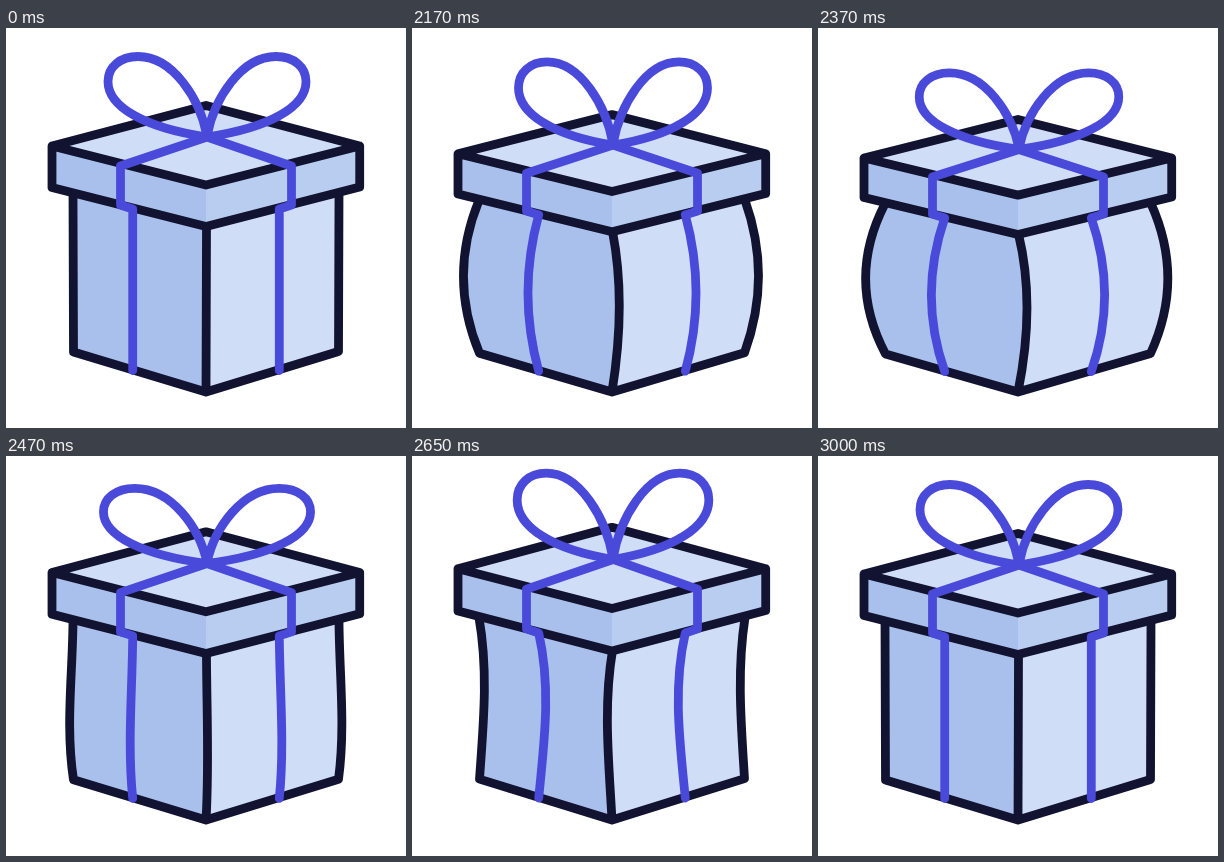
Animation of 400 by 400 pixels, one loop 3020 ms. Source, as an HTML page:

```html
<!DOCTYPE html>
<html lang="en">
<head>
<meta charset="utf-8">
<title>Gift box</title>
<style>
  html, body { margin: 0; width: 100%; height: 100%; overflow: hidden; background: #fff; }
  svg { display: block; width: 100vw; height: 100vh; }
  path { stroke-width: 8.8; stroke-linecap: round; stroke-linejoin: round; }
  .edge { fill: none; stroke: #121331; }
  .ribbon { fill: none; stroke: #4a4ada; }
</style>
</head>
<body>
<svg id="stage" viewBox="0 0 400 400"></svg>
<script>
const LOOP = 3020, START = 2000, END = 3000, FLOOR = 364;
const SHADE = '#a8c0eb', SIDE = '#b9cdf0', LIGHT = '#cfddf6';

const sine = u => (1 - Math.cos(Math.PI * u)) / 2;
const brake = u => 1 - (1 - u) ** 2;
const settle = u => 1 - (1 - u) ** 4;
const swing = u => u < .5 ? 4 * u ** 3 : 1 - 4 * (1 - u) ** 3;

// Eases from a resting value through [time, value, ease] stops and settles back
function travel(t, rest, ...stops) {
  let from = START, value = rest;
  if (t <= from) return rest;
  for (const [to, next, ease] of [...stops, [END, rest, settle]]) {
    if (t < to) return value + (next - value) * ease((t - from) / (to - from));
    from = to;
    value = next;
  }
  return rest;
}

// The box sinks, springs up and settles; its walls and bow follow late
function pose(t) {
  const squash = travel(t, 0, [2320, .058, sine], [2580, -.045, sine]);
  const upper = travel(t, 0, [2320, 27, brake], [2620, -26, swing]);
  const lower = travel(t, 0, [2320, 27, brake], [2620, -11, swing]);
  const bowH = travel(t, 1, [2160, 1.035, sine], [2460, .93, sine], [2580, 1.15, sine]);
  const bowW = 1 - .7 * (bowH - 1) - .001 * upper;
  return { squash, upper, lower, bowH, bowW };
}

// Motion advances in alternating 20 and 30 ms steps
function snap(t) {
  if (t < 2020) return 0;
  const [base, gap] = t < 2550 ? [2020, 30] : [2550, 20];
  const rest = (t - base) % 50;
  return t - rest + (rest >= gap ? gap : 0);
}

const stage = document.getElementById('stage');

function addPath(kind, fill) {
  const p = document.createElementNS('http://www.w3.org/2000/svg', 'path');
  if (kind) p.setAttribute('class', kind);
  if (fill) p.setAttribute('fill', fill);
  stage.append(p);
  return d => p.setAttribute('d', d);
}

const bodyLeft = addPath('', SHADE), bodyRight = addPath('', LIGHT);
const bodyEdge = addPath('edge');
const lidLeft = addPath('', SHADE), lidRight = addPath('', SIDE), lidTop = addPath('', LIGHT);
const lidEdge = addPath('edge');
const ribbon = addPath('ribbon'), bow = addPath('ribbon');

function draw(t) {
  const { squash, upper, lower, bowH, bowW } = pose(snap(t));
  const y = v => v + (FLOOR - v) * squash;
  const pt = (x, v) => `${x.toFixed(2)} ${y(v).toFixed(2)}`;
  const line = (...pts) => pts.map(p => pt(...p)).join(' L');
  // Continues from (x0, y0) to (x1, y1), bowed sideways by a, then b
  const bend = (x0, y0, x1, y1, a, b) => ' C' + [
    pt(x0 + (x1 - x0) / 3 + a, y0 + (y1 - y0) / 3),
    pt(x1 - (x1 - x0) / 3 + b, y1 - (y1 - y0) / 3),
    pt(x1, y1)].join(' ');

  // Outer walls give less inwards than outwards
  const wall = v => v < 0 ? v / 2 : v;
  const a = wall(upper), b = wall(lower);
  const left = 'M' + pt(67, 166) + bend(67, 166, 67.5, 324, -a, -b);
  const right = 'M' + pt(333, 166) + bend(333, 166, 332.5, 323.5, a * .87, b * .87);
  const front = 'M' + pt(200.5, 198) + bend(200.5, 198, 200, 364, upper / 2, lower / 2.5);
  const frontUp = ' L' + pt(200, 364) + bend(200, 364, 200.5, 198, lower / 2.5, upper / 2) + ' Z';
  bodyLeft(left + frontUp);
  bodyRight(right + frontUp);
  bodyEdge(left + ' L' + line([200, 364], [332.5, 323.5]) + right + front);

  const W = [46, 118], N = [200, 77.5], E = [353.7, 118], S = [200, 157];
  const lowW = [46, 159.5], lowS = [200, 198.5], lowE = [353.7, 159];
  lidLeft('M' + line(W, S, lowS, lowW) + ' Z');
  lidRight('M' + line(E, S, lowS, lowE) + ' Z');
  lidTop('M' + line(W, N, E, S) + ' Z');
  lidEdge('M' + line(W, N, E, S) + ' Z M' + line(W, lowW, lowS, lowE, E));

  const strap = dir => {
    const over = 200 + dir * 85.5, down = 200 + dir * 73.3;
    return 'M' + line([201, 109], [over, 138], [over, 177], [down, 181])
      + bend(down, 181, down, 342.5, dir * upper * .68, dir * lower * .68);
  };
  ribbon(strap(-1) + strap(1));

  const loop = dir => {
    const p = (dx, dy) => `${(201 + dir * dx * bowW).toFixed(2)} ${(y(109) - dy * bowH).toFixed(2)}`;
    return `M${p(0, 1)} C${p(7, 38)} ${p(34, 80.5)} ${p(69, 80.5)}`
      + ` C${p(87, 80.5)} ${p(99, 70)} ${p(99, 55.5)} C${p(99, 30)} ${p(62, 9)} ${p(0, 0)}`;
  };
  bow(loop(-1) + loop(1));
}

function tick() {
  draw(performance.now() % LOOP);
  requestAnimationFrame(tick);
}
tick();
</script>
</body>
</html>
```
